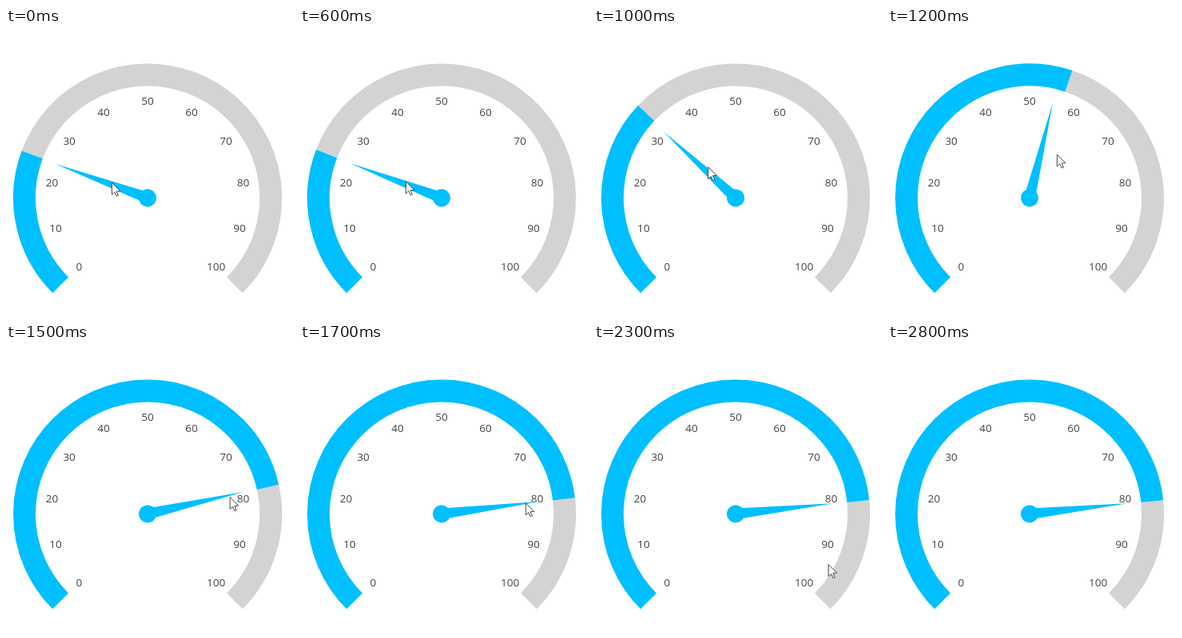
These frames come from a looping animation (360 by 360 pixels, 2.9 s). An HTML page with a canvas:

```html
<!DOCTYPE html>
<html>
<head>
<meta charset="utf-8">
<style>
html, body { margin: 0; width: 100%; height: 100%; overflow: hidden; background: #fff; }
canvas { display: block; }
</style>
</head>
<body>
<canvas id="stage"></canvas>
<script>
const LOOP = 2900, STEP = 100, SIZE = 360;
const CX = 177, CY = 212.4, BLUE = '#00bfff', GREY = '#d3d3d3';
// Angles are degrees clockwise from pointing left.
const MIN = -45, MAX = 225;

const rad = deg => deg * Math.PI / 180;
const sigmoid = (t, mid, spread) => 1 / (1 + Math.exp((mid - t) / spread));
const hump = p => 4 * p * (1 - p);
const smooth = p => p * p * (3 - 2 * p);
const clamp = p => Math.min(1, Math.max(0, p));

const canvas = document.getElementById('stage');
const g = canvas.getContext('2d');
const ratio = window.devicePixelRatio || 1;
canvas.width = canvas.height = SIZE * ratio;
canvas.style.width = canvas.style.height = SIZE + 'px';
g.scale(ratio, ratio);

function band(from, to, color) {
  g.strokeStyle = color;
  g.lineWidth = 28;
  g.beginPath();
  g.arc(CX, CY, 154, rad(180 + from), rad(180 + to));
  g.stroke();
}

function polygon(points) {
  g.beginPath();
  points.forEach(([x, y]) => g.lineTo(x, y));
  g.closePath();
}

function labels() {
  g.fillStyle = '#444';
  g.font = '13.5px "Open Sans", "Noto Sans", sans-serif';
  g.textAlign = 'center';
  for (let v = 0; v <= 100; v += 10) {
    const a = rad(180 + MIN + v * (MAX - MIN) / 100);
    g.fillText(v, CX + 121 * Math.cos(a), CY + 121 * Math.sin(a) + 5);
  }
}

function needle(angle) {
  g.save();
  g.translate(CX, CY);
  g.rotate(rad(angle));
  g.fillStyle = BLUE;
  polygon([[-122.5, 0], [0, -7], [0, 7]]);
  g.fill();
  g.beginPath();
  g.arc(0, 0, 11, 0, 7);
  g.fill();
  g.restore();
}

function cursor(x, y) {
  g.save();
  g.translate(x, y);
  polygon([[0, 0], [0, 15], [3.5, 11.8], [5.8, 17], [8, 16], [5.8, 11], [10.5, 10.6]]);
  g.fillStyle = '#fff';
  g.strokeStyle = '#444';
  g.lineWidth = 1;
  g.fill();
  g.stroke();
  g.restore();
}

function draw(now) {
  const t = Math.floor(now % LOOP / STEP) * STEP;
  const turn = sigmoid(t, 1182, 103);
  const angle = 20.2 + 153.6 * turn;
  // The band runs ahead of the needle while it moves fast.
  const edge = angle + 0.3 + 4.6 * hump(turn) ** 3;

  g.fillStyle = '#fff';
  g.fillRect(0, 0, SIZE, SIZE);
  band(edge, MAX, GREY);
  band(MIN, edge, BLUE);
  labels();
  needle(angle);

  // The pointer drags along half an ellipse, then leaves through the bottom.
  const drag = sigmoid(t, 1192, 74);
  const exit = smooth(clamp((t - 2050) / 550));
  cursor(132.3 + 150 * drag + 25 * exit,
         193.3 + 8 * drag - 39.5 * Math.sqrt(hump(drag)) + 172 * exit);
}

const start = performance.now();
function tick() {
  draw(performance.now() - start);
  requestAnimationFrame(tick);
}
tick();
</script>
</body>
</html>
```
